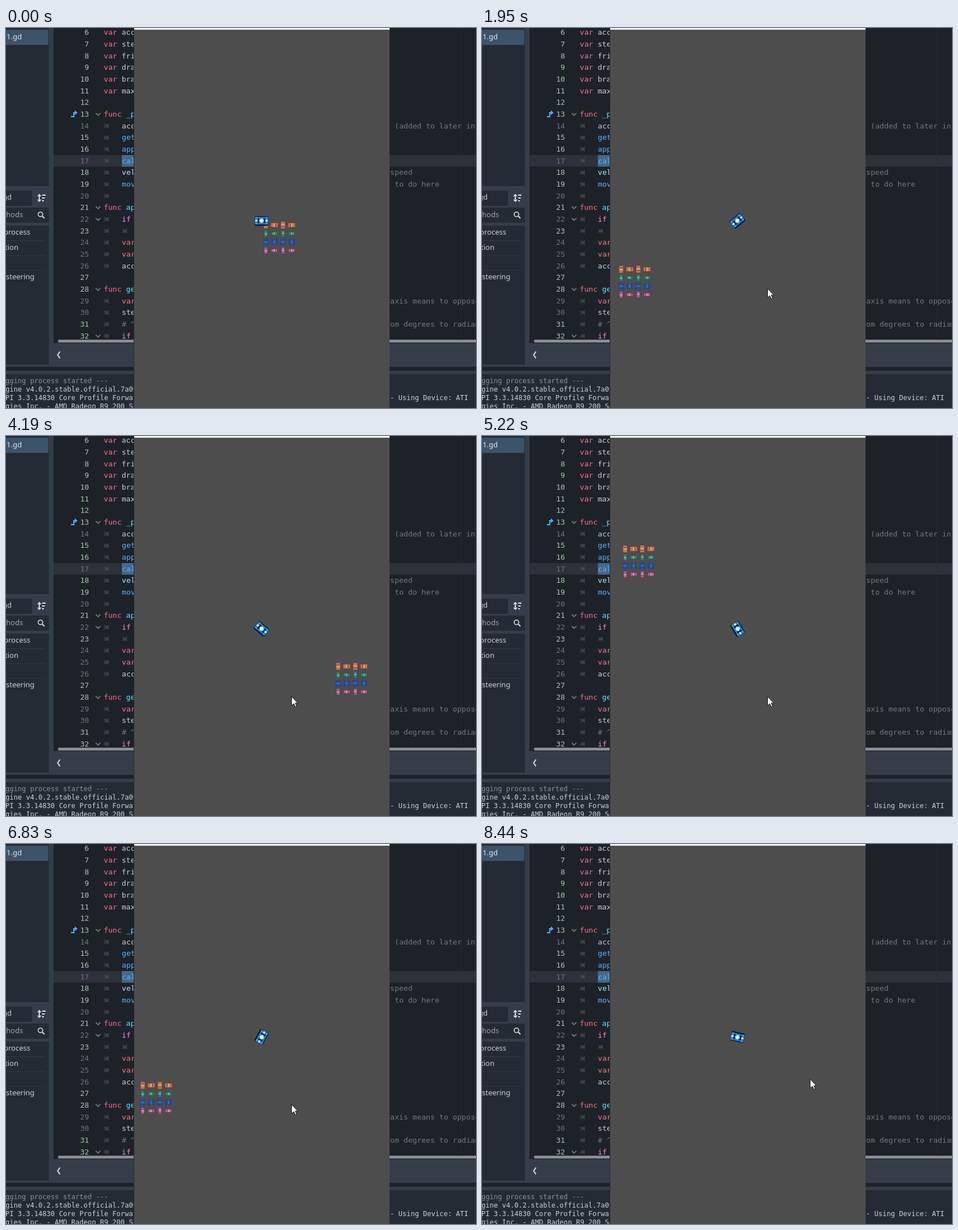
Animation of 832x673 px, one loop 8.91 s. Source, as an HTML page with a canvas:

```html
<!DOCTYPE html>
<html lang="en">
<head>
<meta charset="utf-8">
<style>
  html, body { margin: 0; width: 100%; height: 100%; overflow: hidden; background: #1d2229; }
  canvas { display: block; width: 832px; height: 673px; }
</style>
</head>
<body>
<canvas id="stage" width="832" height="673"></canvas>
<script>
const W = 832, H = 673, LOOP = 8910;
const stage = document.getElementById('stage').getContext('2d');
const backdrop = document.createElement('canvas');
backdrop.width = W;
backdrop.height = H;

const MONO = '"DejaVu Sans Mono", monospace';
const CODE = '13.15px ' + MONO, LOG = '12.1px ' + MONO, UI = '13px "Noto Sans", sans-serif';
const RED = '#ff7085', PINK = '#ff8ccc', BLUE = '#57b3ff', CYAN = '#66e6ff';
const PLAIN = '#cdcfd2', PALE = '#bce0ff', GREY = '#74787d', ICON = '#e0e0e0';
const PANEL = '#252b34', DARK = '#1d2229';

function rect(c, color, x, y, w, h, radius = 0) {
  c.fillStyle = color;
  c.beginPath();
  c.roundRect(x, y, w, h, radius);
  c.fill();
}

function text(c, font, color, x, middle, string, align = 'left') {
  c.font = font;
  c.fillStyle = color;
  c.textAlign = align;
  c.fillText(string, x, middle + 4.3);
}

function line(c, color, width, ...points) {
  c.strokeStyle = color;
  c.lineWidth = width;
  c.beginPath();
  for (let i = 0; i < points.length; i += 2) c.lineTo(points[i], points[i + 1]);
  c.stroke();
}

// ---- Editor behind the game window ----

// Lines 6 to 32. Markers: > tab, v foldable, ~ unsafe (grey line number)
const code = `var acc
var ste
var fri
var dra
var bra
var max

vfunc _p
~>acc
>get
>app
~>cal
>vel
>mov
~>
vfunc ap
~v>if
>>
~>var
~>var
~>acc

vfunc ge
~>var
~>ste
># ^
v>if`.split('\n');

const lineY = n => 8 + (n - 6) * 20.67;

function wordColor(word) {
  if (/^(var|func)$/.test(word)) return RED;
  if (word === 'if') return PINK;
  if (/^(get|app|cal|mov)$/.test(word)) return BLUE;
  if (word === 'vel') return PALE;
  return /[#^]/.test(word) ? GREY : PLAIN;
}

function drawCodeLine(c, source, n) {
  const [, unsafe, fold, tabs, body] = source.match(/^(~?)(v(?=func|>))?(>*)(.*)$/);
  const y = lineY(n);
  text(c, CODE, unsafe ? '#6d7278' : '#a3c9a6', 147, y, n, 'right');
  if (fold) line(c, '#6d7278', 2, 159, y - 2, 163, y + 2, 167, y - 2);
  for (let i = 0; i < tabs.length; i++) {
    const x = 174 + i * 32;
    for (const dx of [0, 3]) line(c, '#50555c', 1.2, x + dx, y - 3, x + dx + 3, y, x + dx, y + 3);
    line(c, '#50555c', 1.2, x + 7, y - 4, x + 7, y + 4);
  }
  let x = 173 + tabs.length * 32;
  for (const word of body.split(/(?<= )/)) {
    const isName = body.startsWith('func') && !word.startsWith('func');
    text(c, CODE, isName ? CYAN : wordColor(word.trim()), x, y, word);
    x += c.measureText(word).width;
  }
}

function drawCode(c) {
  rect(c, DARK, 84, 0, 748, 558);
  rect(c, '#2d323a', 84, 225, 748, 20.5);
  rect(c, '#47678d', 205, 225, 22, 20.5);
  rect(c, '#272c33', 805, 0, 1, 550);
  code.forEach((source, i) => drawCodeLine(c, source, i + 6));
  line(c, BLUE, 2, 115, 157, 120, 157, 120, 150, 124, 150);
  line(c, BLUE, 2, 122, 147, 125, 150, 122, 153);
  text(c, CODE, GREY, 688, lineY(14), '(added to later in');
  text(c, CODE, GREY, 680, lineY(18), 'speed');
  text(c, CODE, GREY, 688, lineY(19), 'to do here');
  text(c, CODE, GREY, 680, lineY(29), 'axis means to oppose');
  text(c, CODE, GREY, 680, lineY(31), 'om degrees to radian');
  rect(c, '#8b8e92', 92, 552, 748, 5, 2);
}

function drawSidebar(c) {
  rect(c, PANEL, 0, 0, 76, 280);
  rect(c, '#3b536b', -5, 3, 80, 27, 3);
  text(c, UI, '#e4e7ea', 1, 16, '1.gd');
  rect(c, PANEL, -5, 288, 51, 27, 3);
  text(c, UI, PLAIN, -6, 300, 'gd');
  rect(c, PANEL, -5, 318, 81, 27, 3);
  text(c, UI, '#9da2a9', 0, 331, 'hods');
  line(c, ICON, 2, 59, 295, 59, 307);
  line(c, ICON, 1.6, 56, 298, 59, 295, 62, 298);
  line(c, ICON, 1.6, 56, 304, 59, 307, 62, 304);
  for (let i = 0; i < 3; i++) rect(c, ICON, 64, 295 + i * 5, 6 - i * 1.5, 2);
  c.beginPath();
  c.arc(61, 330, 4, 0, 7);
  c.stroke();
  line(c, ICON, 2, 64, 333, 68, 337);
  rect(c, PANEL, 0, 350, 76, 246);
  for (let i = 0; i < 3; i++) rect(c, '#343a44', 0, 376 + i * 26.4, 69, 1);
  text(c, UI, PLAIN, -4, 362, 'process');
  text(c, UI, PLAIN, -2, 389, 'tion');
  text(c, UI, PLAIN, 0, 441, 'steering');
}

function drawLog(c) {
  rect(c, DARK, 0, 600, W, 7);
  rect(c, PANEL, 0, 613, W, 60);
  line(c, ICON, 2, 95.5, 573, 91.5, 579, 95.5, 585);
  const rows = [
    'gging process started ---',
    'gine v4.0.2.stable.official.7a09',
    'PI 3.3.14830 Core Profile Forward',
    'gies Inc. - AMD Radeon R9 200 Series'
  ];
  rows.forEach((row, i) => text(c, LOG, i ? PLAIN : '#8b9097', -1, 624.6 + i * 15, row));
  rect(c, PANEL, 679, 613, 153, 60);
  text(c, LOG, PLAIN, 680, 654.6, '- Using Device: ATI');
}

function drawBackdrop() {
  const c = backdrop.getContext('2d');
  rect(c, '#363d4a', 0, 0, W, H);
  drawCode(c);
  drawSidebar(c);
  drawLog(c);
  rect(c, '#4d4d4d', 227, 0, 452, H);
  rect(c, '#ffffff', 227, 0, 452, 3);
  rect(c, '#24282e', 226, 0, 1, H);
}

// ---- Game: the camera follows the car, so the parked cars move instead ----

const START = 1090, STEP = 47.12, LAST = 156;

// Few points of the drive; negative speed is reverse, headings in degrees
const drive = [
  { step: 0, x: 460, y: 349, heading: 0, speed: 0 },
  { step: 19, x: 229, y: 443, heading: -44, speed: 24 },
  { step: 38, x: 300, y: 880, heading: -155, speed: 27 },
  { step: 53, x: 641, y: 772, heading: -240, speed: 27 },
  { step: 66, x: 588, y: 408, heading: -320, speed: 27 },
  { step: 77, x: 333, y: 301, heading: -315, speed: 25 },
  { step: 92, x: 252, y: 191, heading: -299, speed: 0 },
  { step: 108, x: 275, y: 291, heading: -270, speed: -10 },
  { step: 125, x: 239, y: 435, heading: -240, speed: 0 },
  { step: 135, x: 279, y: 368, heading: -231, speed: 17 },
  { step: 154, x: 637, y: 308, heading: -168, speed: 27 },
  { step: 156, x: 690, y: 320, heading: -167, speed: 27 }
];
const radians = degrees => degrees * Math.PI / 180;

function hermite(a, b, slopeA, slopeB, u) {
  const d = b - a;
  return a + u * (slopeA + u * (3 * d - 2 * slopeA - slopeB + u * (slopeA + slopeB - 2 * d)));
}

function poseAt(step) {
  const next = Math.max(1, drive.findIndex(p => p.step >= step));
  const a = drive[next - 1], b = drive[next];
  const span = b.step - a.step, u = (step - a.step) / span;
  const drift = (p, wave) => -p.speed * span * wave(radians(p.heading));
  // Turning follows the distance covered under constant acceleration
  const turned = (2 * a.speed * u + (b.speed - a.speed) * u * u) / (a.speed + b.speed);
  return {
    x: hermite(a.x, b.x, drift(a, Math.cos), drift(b, Math.cos), u),
    y: hermite(a.y, b.y, drift(a, Math.sin), drift(b, Math.sin), u),
    heading: a.heading + (b.heading - a.heading) * turned
  };
}

function drawDrivenCar(c, heading) {
  c.save();
  c.translate(452.3, 341.7);
  c.rotate(radians(heading));
  rect(c, '#0d1826', -12, -8.5, 24, 17, 2);
  rect(c, '#1b86e2', -11.5, -7, 23, 13, 2);
  for (const side of [-7, 4]) {
    rect(c, '#3fa9f5', -11, side, 4, 2);
    rect(c, '#3fa9f5', 7, side, 4, 2);
  }
  rect(c, '#f4f6f8', -11, -2, 22, 3);
  rect(c, '#12253b', -7, -5, 3, 9);
  rect(c, '#12253b', 4, -5, 3, 9);
  rect(c, '#f4f6f8', -2, -4, 4, 7);
  c.restore();
}

const models = [
  { length: 12, width: 9, body: '#cf7048', trim: '#f0a078' },
  { length: 9, width: 7, body: '#259a7b', trim: '#55c8a4' },
  { length: 12, width: 9, body: '#1c4aab', trim: '#356fd6' },
  { length: 10, width: 7, body: '#c9569f', trim: '#f08cca' }
];

function drawParkedCars(c, x, y) {
  models.forEach(({ length, width, body, trim }, row) => {
    for (let column = 0; column < 4; column++) {
      c.save();
      c.translate(x + column * 15.2, y + row * 15);
      c.rotate((column - 1) * Math.PI / 2);
      const l = length / 2, w = width / 2;
      rect(c, '#30292d', -l + 1, -w, 2.5, width);
      rect(c, '#30292d', l - 3.5, -w, 2.5, width);
      rect(c, body, -l, -w + 0.7, length, width - 1.4, 1);
      rect(c, trim, -1.5, -w + 2, 3, width - 4);
      rect(c, '#4a3f45', 1.5, -w + 1.8, 1.2, width - 3.6);
      c.restore();
    }
  });
}

// ---- Mouse pointer ----

function drawPointer(c, t, step) {
  if (t < 70) return;
  const left = (1 - Math.min(4, Math.floor((t - 70) / 45)) / 4) ** 2;
  const away = Math.min(1, Math.max(0, (step - 146) / 7));
  c.save();
  c.translate(505.5 + 249 * left + 75.5 * away, 461.5 + 198 * left - 45 * away);
  const arrow = new Path2D('M0 0V16L4 12.5 6.5 18 9 17 6.5 11.5H11Z');
  c.fillStyle = '#ffffff';
  c.fill(arrow);
  c.strokeStyle = '#111111';
  c.lineWidth = 1;
  c.stroke(arrow);
  c.restore();
}

function draw(t) {
  const step = Math.min(LAST, Math.max(0, Math.floor((t - START + 12) / STEP)));
  const { x, y, heading } = poseAt(step);
  stage.drawImage(backdrop, 0, 0);
  stage.save();
  stage.beginPath();
  stage.rect(227, 3, 452, H - 3);
  stage.clip();
  drawParkedCars(stage, x, y);
  drawDrivenCar(stage, heading);
  stage.restore();
  drawPointer(stage, t, step);
}

drawBackdrop();
const begin = performance.now();
function tick() {
  draw((performance.now() - begin) % LOOP);
  requestAnimationFrame(tick);
}
tick();
</script>
</body>
</html>
```
